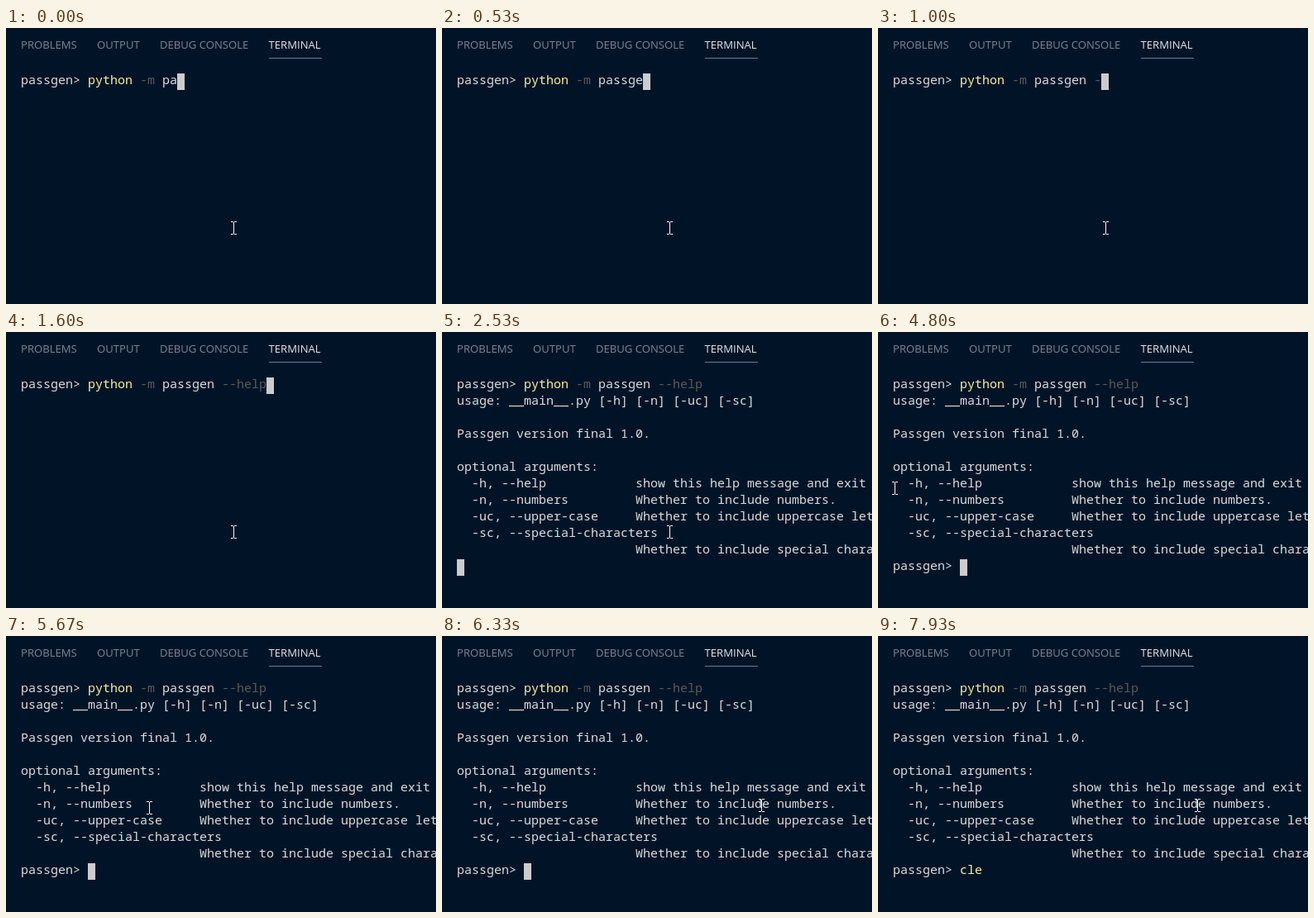
These frames come from a looping animation (520x334 px, 8000 ms). An HTML page with a canvas:

```html
<!DOCTYPE html>
<html lang="en">
<head>
<meta charset="utf-8">
<title>Terminal</title>
<style>
  html, body { margin: 0; width: 520px; height: 334px; overflow: hidden; background: #011427; }
  canvas { display: block; }
</style>
</head>
<body>
<canvas id="stage" width="520" height="334"></canvas>
<script>
const ctx = document.getElementById('stage').getContext('2d');
const LOOP = 8000, TICK = LOOP / 120;
const CELL = 9, ROW = 20, LEFT = 18, TOP = 55;
const BG = '#011427', TEXT = '#dcdcdc', DIM = '#5a5a59', YELLOW = '#fff09a', CARET = '#cccccc';
const PROMPT = 'passgen> ';
const COMMAND = 'python -m passgen --help';
const OUTPUT_AT = 38, PROMPT_AT = 39, CLEAR_AT = 115;

const option = (flags, help) => flags.padEnd(24) + help;
const output = [
  'usage: __main__.py [-h] [-n] [-uc] [-sc]',
  '',
  'Passgen version final 1.0.',
  '',
  'optional arguments:',
  option('  -h, --help', 'show this help message and exit'),
  option('  -n, --numbers', 'Whether to include numbers.'),
  option('  -uc, --upper-case', 'Whether to include uppercase letters.'),
  '  -sc, --special-characters',
  option('', 'Whether to include special characters.')
];

// Each move continues from the last; bow bends its path downwards
const home = { x: 275, y: 242 };
const moves = [
  { from: 54, to: 58, x: 291, y: 190, bow: 0 },
  { from: 64, to: 72, x: 20, y: 189, bow: 38 },
  { from: 76, to: 89, x: 218, y: 207, bow: 8 },
  { from: 89, to: 95, x: 386, y: 205, bow: 0 }
];

const clamp = (v, low, high) => Math.max(low, Math.min(high, v));

function write(text, col, row, color = TEXT) {
  ctx.font = '500 15px "Noto Sans Mono", "DejaVu Sans Mono", monospace';
  ctx.fillStyle = color;
  ctx.fillText(text, LEFT + col * CELL, TOP + row * ROW + 13);
}

function drawTabs() {
  ctx.font = '13.1px "Open Sans", "Noto Sans", sans-serif';
  let x = LEFT;
  for (const name of ['PROBLEMS', 'OUTPUT', 'DEBUG CONSOLE', 'TERMINAL']) {
    const active = name === 'TERMINAL';
    const width = ctx.measureText(name).width;
    ctx.fillStyle = active ? '#e4e7ea' : '#7a8896';
    ctx.fillText(name, x, 25);
    if (active) {
      ctx.fillStyle = '#5f7e97';
      ctx.fillRect(Math.round(x), 36, Math.ceil(width), 1);
    }
    x += width + 24.3;
  }
}

// Writes a partly typed command, coloured word by word
function drawCommand(text, row) {
  write(PROMPT, 0, row);
  let col = PROMPT.length;
  text.split(' ').forEach((word, i) => {
    write(word, col, row, i === 0 ? YELLOW : word.startsWith('-') ? DIM : TEXT);
    col += word.length + 1;
  });
}

function pointerAt(tick) {
  let { x, y } = home;
  for (const m of moves) {
    const p = clamp((tick - m.from) / (m.to - m.from), 0, 1);
    const u = p * p * (3 - 2 * p);
    x += (m.x - x) * u;
    y += (m.y - y) * u + m.bow * Math.sin(Math.PI * u);
  }
  return [Math.round(x), Math.round(y)];
}

function drawPointer([x, y]) {
  ctx.fillStyle = '#ffffff';
  ctx.fillRect(x, y - 7, 1, 14);
  for (const edge of [y - 8, y + 7]) {
    ctx.fillRect(x - 3, edge, 3, 1);
    ctx.fillRect(x + 1, edge, 3, 1);
  }
}

function draw(time) {
  const tick = Math.floor((time % LOOP + 3.4) / TICK) % 120;
  ctx.fillStyle = BG;
  ctx.fillRect(0, 0, 520, 334);
  drawTabs();

  // One character every two ticks, starting half way through the command
  const command = COMMAND.slice(0, 12 + Math.floor(tick / 2));
  drawCommand(command, 0);
  let col = PROMPT.length + command.length, row = 0;

  if (tick >= OUTPUT_AT) {
    output.forEach((line, i) => write(line, 0, i + 1));
    col = 0;
    row = output.length + 1;
  }
  if (tick >= PROMPT_AT) {
    const next = 'cle'.slice(0, clamp(tick - CLEAR_AT, 0, 3));
    drawCommand(next, row);
    col = PROMPT.length + next.length;
  }
  if (tick < 119) {
    ctx.fillStyle = CARET;
    ctx.fillRect(LEFT + col * CELL, TOP + row * ROW, CELL, ROW);
  }
  drawPointer(pointerAt(tick));
}

const start = performance.now();
function loop() {
  draw(performance.now() - start);
  requestAnimationFrame(loop);
}
loop();
</script>
</body>
</html>
```
